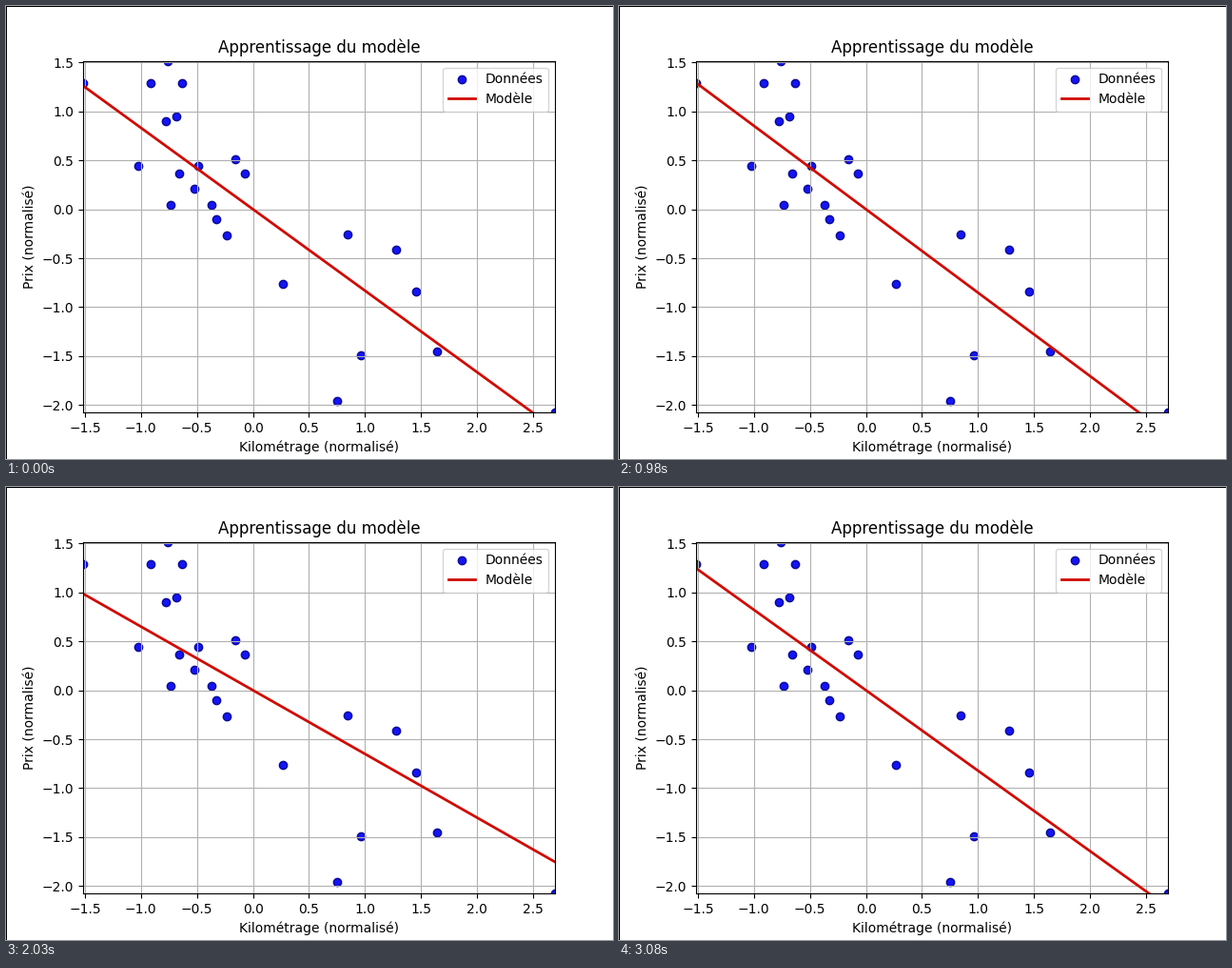
Animation of 638x476 px, one loop 3220 ms. Source, as a matplotlib script:

```python
import numpy as np
import matplotlib.pyplot as plt
from matplotlib.animation import FuncAnimation
from matplotlib.patches import Rectangle

W, H, DPI = 638, 476, 100
FRAMES, INTERVAL = 46, 70
RATE, LAST_STEP = 0.3, 15

km = np.array([240000, 139800, 150500, 185530, 176000, 114800, 166800, 89000,
               144500, 84000, 82029, 63060, 74000, 97500, 67000, 76025,
               48235, 93000, 60949, 65674, 54000, 68500, 22899, 61789])
price = np.array([3650, 3800, 4400, 4450, 5250, 5350, 5800, 5990,
                  5999, 6200, 6390, 6390, 6600, 6800, 6800, 6900,
                  6900, 6990, 7490, 7555, 7990, 7990, 7990, 8290])


def normalise(v):
    return (v - v.mean()) / v.std()


def step_at(i):
    """Training step shown at animation frame i; training restarts at 20."""
    if i < 20:
        return min(10 + (i + 1) // 3, LAST_STEP)
    return 1 + (i - 20) // 3


def slope_at(step):
    """Slope after some steps of gradient descent from zero."""
    return (x * y).mean() * (1 - (1 - RATE) ** step)


x, y = normalise(km), normalise(price)
ends = np.array([x.min(), x.max()])

fig = plt.figure(figsize=(W / DPI, H / DPI), dpi=DPI, facecolor="white")
ax = fig.add_axes([81 / W, (H - 427.2) / H, 496 / W, 369.6 / H])
ax.scatter(x, y, color="#1414f5", edgecolor="#0a0a96", label="Données")
line, = ax.plot(ends, 0 * ends, color="#d00c04", lw=2, label="Modèle")
ax.set(xlim=ends, ylim=(y.min(), y.max()),
       title="Apprentissage du modèle",
       xlabel="Kilométrage (normalisé)", ylabel="Prix (normalisé)")
ax.grid(True)
ax.legend(loc="upper right")

# window border along the left and top edges
for w, h in ((1 / W, 1), (1, 1 / H)):
    fig.add_artist(Rectangle((0, 1 - h), w, h, color="black", lw=0,
                             transform=fig.transFigure))


def update(i):
    line.set_ydata(slope_at(step_at(i)) * ends)
    return line,


anim = FuncAnimation(fig, update, frames=FRAMES, interval=INTERVAL,
                     repeat=True, repeat_delay=0)
plt.show()
```
